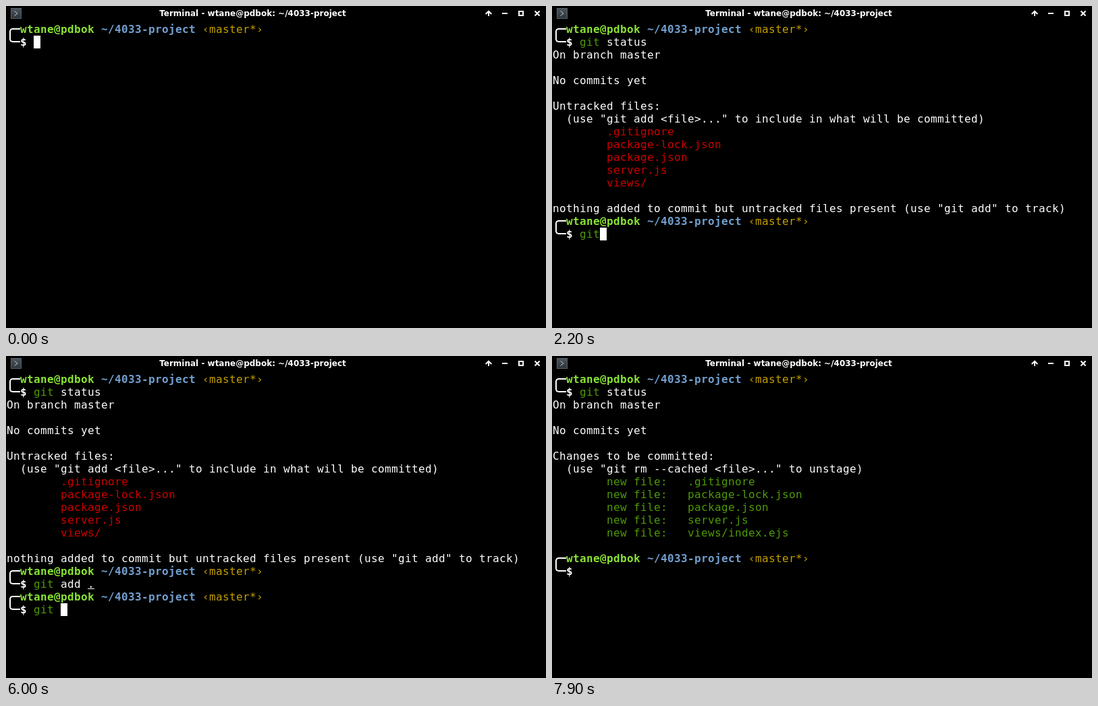
An HTML page that plays this animation: 800 by 478 pixels, repeating every 8 s.

```html
<!DOCTYPE html>
<html lang="en">
<head>
<meta charset="utf-8">
<title>Terminal</title>
<style>
  html, body { margin: 0; width: 100%; height: 100%; overflow: hidden; background: #000; }
  #stage { position: relative; width: 800px; height: 478px; overflow: hidden; background: #000; color: #fff; }
  #chrome { position: absolute; left: 0; top: 0; }
  #title {
    position: absolute; left: 28px; width: 675px; top: 4px; text-align: center;
    font: bold 12px/15px "DejaVu Sans", sans-serif; white-space: pre;
  }
  #screen {
    position: absolute; left: 1px; top: 25px;
    font: 16px/19px "DejaVu Sans Mono", monospace;
    letter-spacing: calc(10px - 1ch); white-space: pre; font-variant-ligatures: none;
  }
  .row { position: relative; height: 19px; }
  .prompt::before {
    content: ""; position: absolute; left: 4px; top: 8px; width: 16px; height: 21px;
    box-sizing: border-box; border: 2px solid #fff; border-right: 0; border-radius: 5px 0 0 5px;
  }
  .user, .dir, .sign, .unknown { font-weight: bold; }
  .user { color: #8ae234; }
  .dir { color: #729fcf; }
  .branch { color: #c4a000; }
  .green { color: #4e9a06; }
  .red { color: #cc0000; }
  .unknown { color: #ef2929; }
  .path { text-decoration: underline 1px; text-underline-offset: 1px; text-decoration-skip-ink: none; }
  .cursor { position: absolute; top: 0; width: 10px; height: 19px; background: #fff; }
</style>
</head>
<body>
<div id="stage">
  <svg id="chrome" width="800" height="24" fill="none" stroke="#fff" stroke-width="2">
    <defs>
      <linearGradient id="slate" x2="0" y2="1">
        <stop stop-color="#4c555d"/><stop offset="1" stop-color="#2d343a"/>
      </linearGradient>
    </defs>
    <rect x="7.5" y="3.5" width="15" height="15" fill="url(#slate)" stroke="#59626a" stroke-width="1"/>
    <path d="M12.5 7.5l4.5 3.5l-4.5 3.5" stroke="#c3c9ce" stroke-width="1"/>
    <path d="M715 15V8M710.7 12L715 7.7L719.3 12"/>
    <path d="M735 11H743"/>
    <rect x="760" y="8" width="6" height="6"/>
    <path d="M783.5 7.5L790.5 14.5M790.5 7.5L783.5 14.5"/>
  </svg>
  <div id="title"></div>
  <div id="screen"></div>
</div>
<script>
const LOOP = 8000;
const USER = "wtane@pdbok";
const DIR = "~/4033-project";
const STATUS = "git status";
const ADD = "git add .";

const escapeHtml = s => s.replace(/&/g, "&amp;").replace(/</g, "&lt;");
const span = (cls, text) => `<span class="${cls}">${escapeHtml(text)}</span>`;
const row = (html = "", cls = "") => `<div class="row ${cls}">${html}</div>`;
const plain = lines => lines.map(line => row(escapeHtml(line)));
const indent = " ".repeat(8);

// Colours a command line the way the shell does while it is typed.
function highlight(text) {
  const [word] = text.split(" ");
  const rest = text.slice(word.length);
  const head = word && span(word === "gi" ? "unknown" : "green", word);
  return head + (rest.endsWith(".")
    ? escapeHtml(rest.slice(0, -1)) + span("path", ".")
    : escapeHtml(rest));
}

function prompt(text = "", cursor = false) {
  const block = cursor ? `<i class="cursor" style="left:${40 + text.length * 10}px"></i>` : "";
  return [
    row("  " + span("user", USER) + " " + span("dir", DIR) + " " + span("branch", "‹master*›"), "prompt"),
    row("  " + span("sign", "$") + " " + highlight(text) + block)
  ];
}

const files = [".gitignore", "package-lock.json", "package.json", "server.js"];
const header = ["On branch master", "", "No commits yet", ""];

const untracked = [
  ...prompt(STATUS),
  ...plain([...header, "Untracked files:",
    '  (use "git add <file>..." to include in what will be committed)']),
  ...[...files, "views/"].map(name => row(indent + span("red", name))),
  ...plain(["", 'nothing added to commit but untracked files present (use "git add" to track)'])
];
const added = [...untracked, ...prompt(ADD)];
const staged = [
  ...prompt(STATUS),
  ...plain([...header, "Changes to be committed:",
    '  (use "git rm --cached <file>..." to unstage)']),
  ...[...files, "views/index.ejs"].map(name => row(indent + span("green", "new file:   " + name))),
  row()
];

const idleTitle = `Terminal - ${USER}: ${DIR}`;
const steps = [];
const show = (at, history, text = "", cursor = true, title = idleTitle) =>
  steps.push({ at, history, text, cursor, title });
const type = (start, history, command, counts) =>
  counts.forEach((n, i) => show(start + i * 100, history, command.slice(0, n)));

show(0, []);
show(100, [], "", false);
type(300, [], STATUS, [1, 2, 3, 4, 5, 6, 7, 8, 9]);
show(1200, untracked, "", true, "Terminal - " + STATUS);
show(1300, untracked);
show(1800, untracked, "", false);
type(2000, untracked, ADD, [1, 2, 3, 4, 5, 6, 7]);
show(2800, untracked, "git add ");
show(3300, untracked, ADD);
show(3900, untracked, ADD, false);
show(4200, added);
show(4800, added, "", false);
show(5400, added);
type(5700, added, STATUS, [1, 2, 3, 4, 5, 7, 8]);
type(6700, added, STATUS, [9, 10]);
show(7100, [], STATUS);
show(7300, staged);
show(7900, staged, "", false);

const screenEl = document.getElementById("screen");
const titleEl = document.getElementById("title");
const start = performance.now();
let current;

function draw() {
  const time = (performance.now() - start) % LOOP;
  const step = steps.filter(s => s.at <= time).pop();
  if (step !== current) {
    current = step;
    screenEl.innerHTML = [...step.history, ...prompt(step.text, step.cursor)].join("");
    titleEl.textContent = step.title;
  }
  requestAnimationFrame(draw);
}
draw();
</script>
</body>
</html>
```
